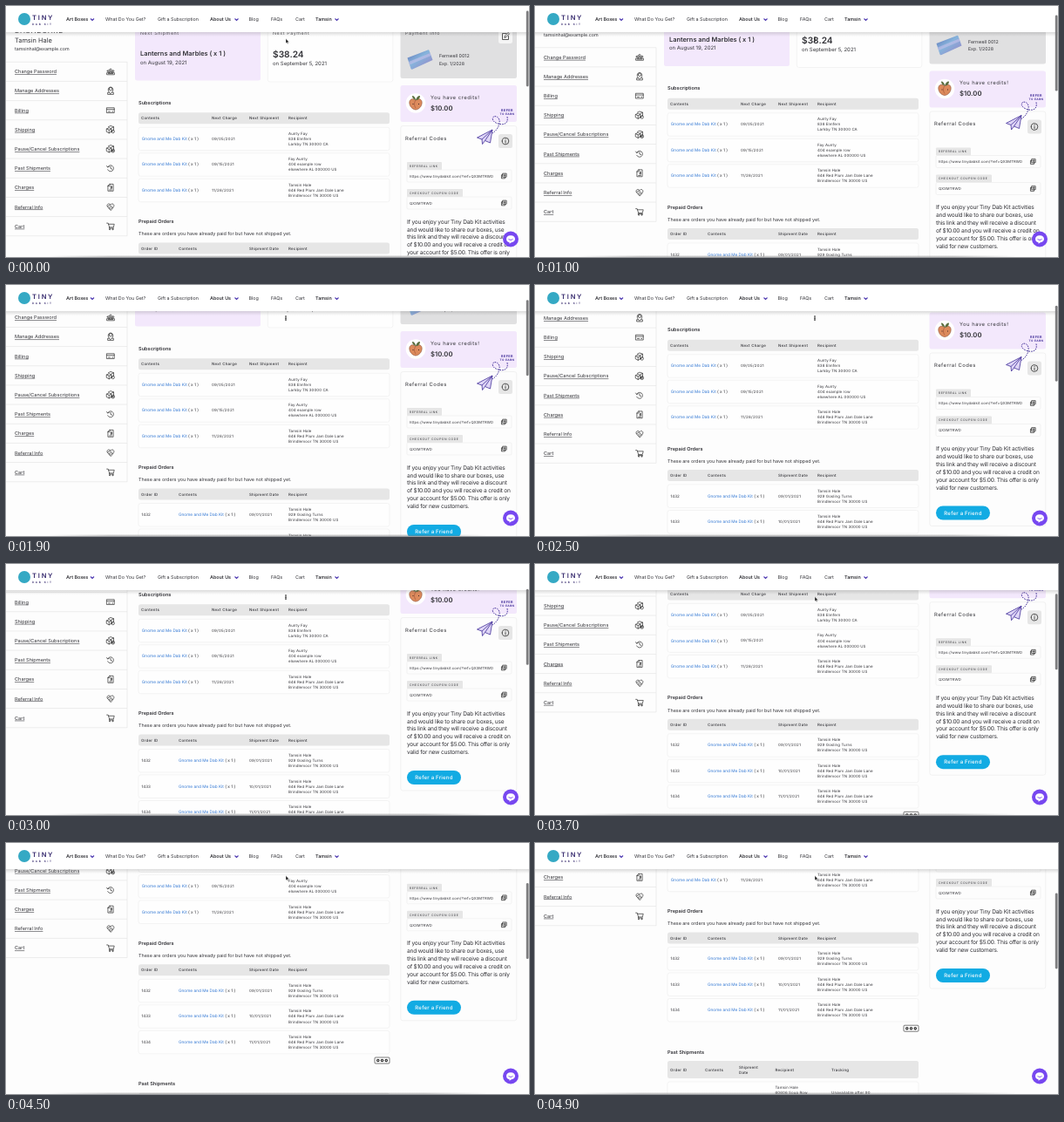
Write an HTML page that moves like this. It is 600x288 px and loops after 5 s.

```html
<!DOCTYPE html>
<html lang="en">
<head>
<meta charset="utf-8">
<title>Account dashboard</title>
<style>
@property --scroll { syntax: "<number>"; inherits: true; initial-value: 0; }
html, body { margin: 0; width: 100%; height: 100%; overflow: hidden; background: #fdfdfd; }
svg { display: block; width: 600px; height: 288px; animation: scroll 5s infinite; }
text { font-family: Inter, "Open Sans", sans-serif; fill: #333338; text-rendering: geometricPrecision; white-space: pre; }
.b { font-weight: 600; }
.m { font-weight: 500; }
.u { text-decoration: underline; text-decoration-thickness: .4px; text-underline-offset: 1.1px; }
.link { fill: #3479d4; }
.icon { fill: none; stroke: #222; stroke-width: .75; stroke-linecap: round; stroke-linejoin: round; }
#page { transform: translateY(calc(var(--scroll) * -1px)); }
#thumb { transform: translateY(calc(var(--scroll) * .307px)); }
#arrow { animation: arrow 5s step-end infinite; }
#beam { animation: beam 5s step-end infinite; }
@keyframes scroll {
  0% { --scroll: 0; animation-timing-function: steps(6); }
  12% { --scroll: 10; animation-timing-function: steps(1); }
  14% { --scroll: 10; animation-timing-function: steps(3); }
  20% { --scroll: 16.5; animation-timing-function: steps(9); }
  38% { --scroll: 38; animation-timing-function: steps(6); }
  50% { --scroll: 59.5; animation-timing-function: steps(5); }
  60% { --scroll: 76; animation-timing-function: steps(11); }
  82% { --scroll: 104; animation-timing-function: steps(3); }
  88% { --scroll: 123; animation-timing-function: steps(5); }
  98%, 100% { --scroll: 169; }
}
@keyframes arrow { 0% { opacity: 1; } 12% { opacity: 0; } 72%, 100% { opacity: 1; } }
@keyframes beam { 0% { opacity: 0; } 12% { opacity: 1; } 72%, 100% { opacity: 0; } }
</style>
</head>
<body>
<svg viewBox="0 0 600 288" xmlns="http://www.w3.org/2000/svg">
  <defs>
    <linearGradient id="shade" x2="0" y2="1">
      <stop stop-color="#555" stop-opacity=".2"/><stop offset="1" stop-color="#555" stop-opacity="0"/>
    </linearGradient>
    <linearGradient id="foot">
      <stop offset=".08" stop-color="#777" stop-opacity="0"/><stop offset=".2" stop-color="#777" stop-opacity=".4"/>
      <stop offset=".8" stop-color="#777" stop-opacity=".4"/><stop offset=".92" stop-color="#777" stop-opacity="0"/>
    </linearGradient>
    <linearGradient id="plastic" y2="1">
      <stop stop-color="#5d6fb4"/><stop offset=".45" stop-color="#86b4dc"/><stop offset="1" stop-color="#9a7fc4"/>
    </linearGradient>
  </defs>
  <g id="page"></g>
  <g id="fixed"></g>
  <rect id="thumb" x="596.8" y="5.5" width="2.8" height="87" rx="1.4" fill="#7c7c7e"/>
  <path id="arrow" d="M321 37.6v5.2l1.2-1.1.8 1.8.9-.4-.8-1.7h1.7z" fill="#111" stroke="#fff" stroke-width=".4"/>
  <path id="beam" d="M320 35.500q1 0 1 .8v3.600q0 .8-1 .8M322 35.500q-1 0-1 .8v3.600q0 .8 1 .8M320.300 38.600h1.400" fill="none" stroke="#222" stroke-width=".6"/>
</svg>
<script>
const USER = "Tamsin Hale", KIT = "Gnome and Me Dab Kit", CODE = "QX3MTRWD";
const HOME = [USER, "646 Red Plum Jam Dale Lane", "Brindlemoor TN 30000 US"];
const LILAC = "#f3e8fc", VIOLET = "#43309a";

// y is the middle of the capitals
const text = (x, y, size, str, cls = "", attrs = "") =>
  `<text x="${x}" y="${y + size * 0.36}" font-size="${size}" class="${cls}" ${attrs}>${str}</text>`;
const spaced = n => `letter-spacing="${n}"`;
const box = (x, y, w, h, fill, stroke = "none", r = 2.5) =>
  `<rect x="${x}" y="${y}" width="${w}" height="${h}" rx="${r}" fill="${fill}" stroke="${stroke}" stroke-width=".6"/>`;
const icon = (x, y, d, scale = 1) => `<path class="icon" transform="translate(${x} ${y}) scale(${scale})" d="${d}"/>`;
const dot = (x, y, r) => `M${x - r} ${y}a${r} ${r} 0 1 0 ${2 * r} 0a${r} ${r} 0 1 0 ${-2 * r} 0`;
const lines = (x, y, size, gap, list, attrs) =>
  list.map((s, i) => text(x, y + i * gap, size, s, "", attrs)).join("");

const crates = "M-5-1 -2-2.5 1-1V3L-2 4.5 -5 3zM-5-1 -2 .5 1-1M-2 .5v4M-3-3.5 0-5 4-3.5V1L1.5 2.5M4-3.5 1-2";
const menu = [
  ["Change Password", dot(0, -2.3, 1.4) + dot(-3.3, -.8, 1.1) + dot(3.3, -.8, 1.1) + "M-5 3.5V1.5h10v2zM-2 1.5V0h4v1.5M-3 2.5h6"],
  ["Manage Addresses", dot(0, -2.5, 2) + "M-2 1.5C-4-1-3.5-5 0-5S4-1 2 1.5L0 3.5zM-2 2H-3.8V4.5H3.8V2H2"],
  ["Billing", "M-4.8-3.3h9.6v6.6h-9.6zM-4.8-1.2h9.6M-3 1.5h2.5M2 1.5h1"],
  ["Shipping", crates + dot(3, 2.4, 2)],
  ["Pause/Cancel Subscriptions", crates + dot(3, 2.4, 2.2) + "M2.5 1.6v1.6M3.6 1.6v1.6"],
  ["Past Shipments", "M-3.8-1.5A4 4 0 1 1-3.8 1.8M-5-3l1.2 1.7 1.9-.8M0-2.2V.4L2 1.2"],
  ["Charges", "M-1-4.5H3.5v9h-7V-2zM-1-4.5V-2h-2.5M-1.5 3h3M1-2v3.5M2-1.2C0-2-.3-.2 1-.1S2 1.6 0 1"],
  ["Referral Info", "M0 4.3-4-.2C-6-3-2-5.6 0-2.6 2-5.6 6-3 4-.2zM-3.8-.5-.8-2.3 3 1.4M-2 1.5 0-.3M-.6 3 1.2 1"],
  ["Cart", "M-5-4h1.8L-1.5 1.5H3.7L4.8-2.7H-2.7M-1.5 1.5-2 2.7H4" + dot(-1, 4, .7) + dot(3, 4, .7)]
];

const section = (y, str) => text(152, y, 5.6, str, "b");
const head = (y, cols, h = 13) => box(152, y - h / 2, 288, h, "#e6e6e6") +
  cols.map(([x, s]) => text(x, y, 4.4, s, "m", spaced(.25))).join("");
const item = (x, y) => `<text x="${x}" y="${y + 1.7}" font-size="4.75"><tspan class="link">${KIT}</tspan> ( x 1 )</text>`;
const date = (x, y, s) => text(x, y, 4.4, s, "", spaced(.3));
const person = (x, y, list) => lines(x, y - 6, 4.4, 6.1, list, spaced(.1));
const row = y => box(152, y - 13, 288, 26.5, "#fefefe", "#ececec");

const subs = [
  ["09/05/2021", ["Aunty Fay", "838 Elmfern", "Larkby TN 30000 CA"]],
  ["09/15/2021", ["Fay Aunty", "404 example row", "elsewhere AL 000000 US"]],
  ["11/26/2021", HOME]
];
const orders = [
  ["1432", "09/01/2021", [USER, "929 Gosling Turns", HOME[2]]],
  ["1433", "10/01/2021", HOME],
  ["1434", "11/01/2021", HOME]
];

function sidebar() {
  const top = 64.3, pitch = 22.17;
  const rule = y => `<path d="M0 ${y}H139" stroke="#e6e6e6" stroke-width=".7"/>`;
  return text(10, 28, 8, "DASHBOARD", "", spaced(.8)) +
    text(10, 39.8, 7.4, USER) + text(10, 49.2, 5.3, "tamsinhal@example.com") + rule(top) +
    `<path d="M139 ${top}v${pitch * 9}" stroke="#e6e6e6" stroke-width=".7"/>` +
    menu.map(([name, d], i) => {
      const y = top + 11 + i * pitch;
      return text(10, y, 5.6, name, "u") + icon(120, y, d, .88) + rule(y + 11.1);
    }).join("");
}

function cards() {
  const label = (x, s) => text(x, 31.5, 5.4, s, "", spaced(.55) + ' opacity=".8"');
  return box(148, 0, 144, 85.5, LILAC) + box(300.3, 0, 143.5, 87, "#fefefe", "#ececec") +
    label(154, "Next Shipment") + label(306, "Next Payment") +
    text(154, 54.7, 7.4, "Lanterns and Marbles ( x 1 )", "b") + text(154, 64.7, 6, "on August 19, 2021") +
    text(306, 55.8, 10.2, "$38.24", "b") + text(306, 66.3, 6, "on September 5, 2021") +
    box(452.5, 0, 133.5, 83, "#e0e0e1") + label(458, "Payment Info") +
    box(565, 26.5, 16, 16.5, "#f5f5f5") +
    icon(573, 35, "M1-3.5h-4.5v7h7V-.5M-1 1l.4-1.8L3.2-4.5l1.3 1.3L.8.6z") +
    `<path d="M460.5 59.5 484 50.5Q485 50 485.5 51L489.5 62 466.5 72.5Q465 73 464.5 72z" fill="url(#plastic)"/>
     <path d="M462 64 486.5 54 487.5 57 463 67.5z" fill="#d3c4ee" opacity=".5"/>` +
    text(497, 57.2, 5.3, "Fernwell 0012") + text(497, 65.7, 5.2, "Exp. 1/2028");
}

function credits() {
  return box(452.5, 91, 133.5, 42, LILAC) +
    `<circle cx="470" cy="111.5" r="11.3" fill="#fff"/>
     <path d="M470 108c5-3 8 0 7 4.500s-5 6.500-7 6.500-6-2-7-6.500 2-7.500 7-4.500z" fill="#dc8a5c" stroke="#8e5038" stroke-width=".6"/>
     <path d="M470 108c-2 3-2 6 0 9" fill="none" stroke="#a4573d" stroke-width=".7"/>
     <path d="M470 108c-3-1-4-3-4-5 2 0 4 2 4 5 1-3 2-5 5-5 0 3-2 5-5 5z" fill="#5b6e3f"/>
     <path d="M467 112v1M473.500 112v1" stroke="#3c2622"/>` +
    text(487, 104.7, 5.9, "You have credits!", "", spaced(.5)) + text(487, 117, 7.7, "$10.00", "b");
}

function referral() {
  const field = (y, w, name, value) => box(460, y, w, 9, "#e6e6e6", "none", 1) +
    text(463, y + 4.6, 3.4, name, "", spaced(.55)) + box(460, y + 9, 120, 14, "none", "#ebebeb", 1.5) +
    text(463, y + 16.3, 4.2, value, "", spaced(.13)) +
    icon(571.3, y + 16, "M-1.3-3h4.3v4.3h-4.3zM-1.3-1.3H-3V3H1.3V1.3M.9-2v2.3M-.3-.8h2.4", .95);
  const badge = (y, size, str) => text(575, y, size, str, "b",
    `text-anchor="middle" style="fill:${VIOLET};font-weight:700" ` + spaced(.4));
  return box(452.8, 137.5, 133, 198.5, "none", "#e9e9e9") +
    text(458, 151.7, 5.9, "Referral Codes", "", spaced(.45)) +
    box(565, 147, 16, 16, "#e6e6e6") + icon(573, 155, dot(0, 0, 3.8) + "M0-.4V2M0-2v.1") +
    field(179, 40, "REFERRAL LINK", "https://www.tinydabkit.com/?ref=" + CODE) +
    field(210, 64, "CHECKOUT COUPON CODE", CODE) +
    lines(460, 247.3, 6.6, 8.9, [
      "If you enjoy your Tiny Dab Kit activities", "and would like to share our boxes, use",
      "this link and they will receive a discount", "of $10.00 and you will receive a credit on",
      "your account for $5.00. This offer is only", "valid for new customers."], spaced(-.21)) +
    box(460, 313, 62, 16, "#12abe3", "none", 8) +
    text(491, 321, 6.1, "Refer a Friend", "m", 'text-anchor="middle" style="fill:#fff" ' + spaced(.2)) +
    badge(119.3, 3.8, "REFER") + badge(123.6, 3.2, "TO EARN") +
    `<g fill="none" stroke="${VIOLET}" stroke-linejoin="round">
       <path d="M575 127C577 137 568 137 562 134 556 131 558 125 563 127 569 130 566 141 558 146" stroke-width="1" stroke-dasharray="1.6 1.1"/>
       <path d="M540.500 151 558 142 555.500 157 549.500 154.500 546.500 158.500 546 153zM546 153 558 142 549.500 154.500" fill="#ded5f6" stroke-width=".8"/>
     </g>`;
}

function tables() {
  const cells = [426.8, 431.5, 436.2].map(x => dot(x, 381.7, 1.2)).join("");
  return section(110.7, "Subscriptions") +
    head(128.7, [[155, "Contents"], [236, "Next Charge"], [279, "Next Shipment"], [324, "Recipient"]]) +
    subs.map(([day, who], i) => {
      const y = 152.2 + i * 29.5;
      return row(y) + item(155.8, y) + date(236, y, day) + person(324, y, who);
    }).join("") +
    section(247, "Prepaid Orders") +
    text(152, 261.5, 5.4, "These are orders you have already paid for but have not shipped yet.") +
    head(278, [[155, "Order ID"], [198, "Contents"], [279, "Shipment Date"], [324, "Recipient"]]) +
    orders.map(([id, day, who], i) => {
      const y = 301.5 + i * 29.5;
      return row(y) + text(155.5, y, 4.5, id) + item(198, y) + date(279, y, day) + person(324, y, who);
    }).join("") +
    box(423, 378.2, 17, 7, "#fff", "#222", 1) + `<path class="icon" style="stroke-width:1.1" d="${cells}"/>` +
    section(408.5, "Past Shipments") +
    head(429, [[155, "Order ID"], [195, "Contents"], [275.5, "Recipient"], [340, "Tracking"]], 20) +
    text(234, 426, 4.4, "Shipment", "m", spaced(.25)) + text(234, 432, 4.4, "Date", "m", spaced(.25)) +
    box(152, 443, 288, 27, "#fefefe", "#ececec") +
    person(275.5, 455.5, [USER, "60606 Soup Row"]) + text(340, 455.5, 4.4, "Unavailable after 90", "", spaced(.15));
}

function chrome() {
  const nav = [[69, "Art Boxes", 99], [114, "What Do You Get?"], [174, "Gift a Subscription"], [234, "About Us", 264.5],
    [278.5, "Blog"], [304, "FAQs"], [332, "Cart"], [355, "Tamsin", 379.5]];
  return `<rect y="30" width="600" height="5" fill="url(#shade)"/><rect width="600" height="30" fill="#fff"/>
    <circle cx="21" cy="15" r="7" fill="#35a9c4"/>` +
    text(30, 13.3, 7.5, "TINY", "b", 'style="fill:#33266b" ' + spaced(1.8)) +
    text(30, 20.5, 3, "DAB KIT", "b", 'style="fill:#33266b" ' + spaced(1.7)) +
    nav.map(([x, s, arrow]) => text(x, 15.5, 5.4, s, arrow ? "b" : "") +
      (arrow ? `<path d="M${arrow - 2} 14.5l2 2 2-2" fill="none" stroke="#4b36b0" stroke-width="1.1"/>` : "")).join("") +
    `<rect y="286.6" width="600" height="1.4" fill="url(#foot)"/>
     <circle cx="579" cy="267.5" r="9" fill="#7748f0"/>
     <path d="M579 263.2c3.4 0 5 1.7 5 4s-1.6 3.8-4 4l-2.5 1.6v-1.6c-2.2-.3-3.5-1.8-3.5-4s1.600-4 5-4z" fill="#fff"/>
     <path d="M576.500 267.500q2.500 2.200 5 0" fill="none" stroke="#7748f0" stroke-width=".9"/>`;
}

document.getElementById("page").innerHTML = sidebar() + cards() + credits() + referral() + tables();
document.getElementById("fixed").innerHTML = chrome();
</script>
</body>
</html>
```
